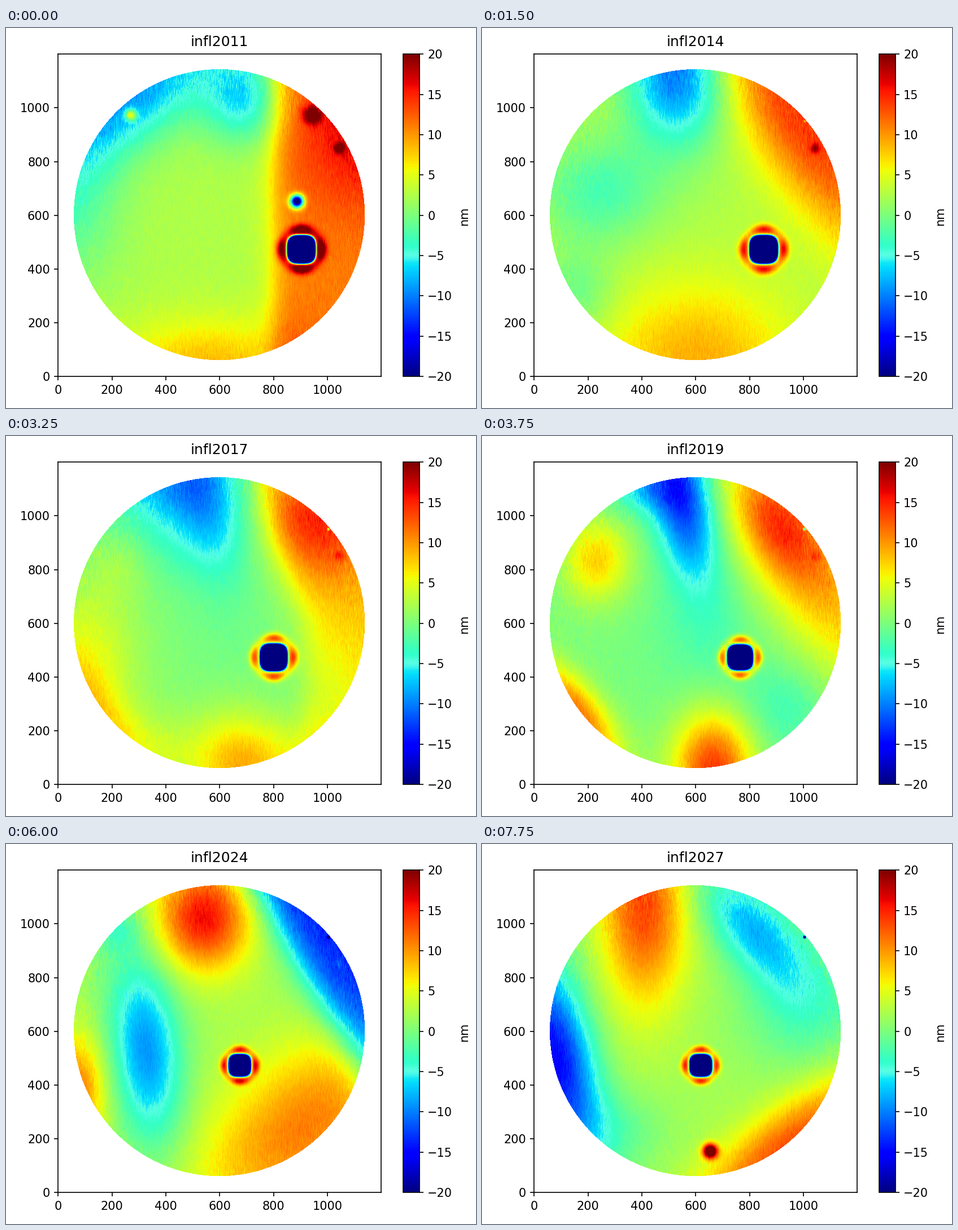
Recreate the animation shown at these times as a matplotlib script. Size 832 px wide and 673 px high, loop 8 s.

```python
import numpy as np
import matplotlib.pyplot as plt
from matplotlib.animation import FuncAnimation
from matplotlib.colors import ListedColormap

W, H, DPI = 832, 673, 128
PT = 150 / DPI
STEP_MS, STEPS = 250, 32
FIRST_YEAR = 2011
CUTS = [2, 3, 6, 8, 10, 13, 14, 15, 18, 19, 20, 21, 24, 26, 28, 31]

plt.rcParams.update({
    "font.family": "DejaVu Sans", "font.size": 10 * PT,
    "axes.titlesize": 12 * PT, "axes.titlepad": 6.6 * PT,
    "axes.linewidth": 0.8 * PT,
})
for axis in ("xtick", "ytick"):
    plt.rcParams.update({
        f"{axis}.major.size": 3.5 * PT, f"{axis}.major.width": 0.8 * PT,
        f"{axis}.major.pad": 3.5 * PT,
    })

# Pixel grid over the disc, in stage pixels
X0, Y0, N = 119, 72, 518
CX, CY, R = 377.6, 330.6, 257.6
HOLE_Y = 392
X, Y = np.meshgrid(X0 + 0.5 + np.arange(N), Y0 + 0.5 + np.arange(N))
RADIUS = np.hypot(X - CX, Y - CY) / R


def blob(x, y, height, sx, sy=None, tilt=0):
    """Gaussian hill; tilt turns its sx axis clockwise, in degrees."""
    c, s = np.cos(np.radians(tilt)), np.sin(np.radians(tilt))
    a = (c * (X - x) + s * (Y - y)) / sx
    b = (c * (Y - y) - s * (X - x)) / (sy or sx)
    return height * np.exp(-(a ** 2 + b ** 2) / 2)


def rise(dist, height, width):
    """Smooth step across the line where dist is zero."""
    return height / (1 + np.exp(np.clip(-dist / width, -30, 30)))


def valley(center, depth, width):
    return -depth * np.exp(-((X - center) / width) ** 2 / 2)


# Smooth part of the surface, in nm, for the key years
SURFACES = {
    2011: 2.5 + rise(X - 474, 8.5, 13)
    + blob(360, 600, 6, 110, 60) + blob(640, 170, 6, 90, 100)
    + blob(225, 115, -11, 130, 60, -35) + blob(420, 125, -8.5, 50, 55)
    + blob(120, 290, -4.5, 60, 110),

    2014: 2.5 + blob(570, 170, 11.5, 190, 65, 57)
    + blob(345, 80, -13, 60, 88) + blob(210, 290, -5, 75, 65)
    + blob(170, 470, -3.5, 45, 50) + blob(380, 590, 6.5, 120, 100),

    2016: 0.5 + rise(X - 486 - 0.33 * (np.minimum(Y, 330) - 205), 7, 14)
    + blob(310, 70, -9.5, 90, 80) + blob(330, 180, -3, 130, 70)
    + blob(560, 140, 9, 75, 70) + blob(135, 410, 8, 65, 95)
    + blob(480, 580, 7, 100, 60) + blob(240, 560, 4.5, 90, 50),

    2019: blob(352, 105, -13.5, 105, 38, 78) + blob(285, 95, -5, 45, 30)
    + blob(400, 350, -2, 70, 80) + blob(203, 220, 7.5, 42, 52)
    + blob(520, 150, 9.5, 85, 48, 62) + blob(620, 270, 8, 170, 80, 60)
    + blob(165, 490, 11.5, 80, 32, 50) + blob(410, 590, 14, 50, 70)
    + blob(540, 480, -3, 60),

    2022: 0.5 + blob(120, 320, 24, 65, 150)
    + valley(322 + 0.00062 * (Y - 150) ** 2, 8.5, 46)
    + blob(320, 115, -5, 45, 55)
    + blob(565, 320, 12, 52, 130) + blob(590, 210, 5, 35, 60),

    2024: 2 + blob(350, 130, 14, 58, 65)
    + rise(0.865 * (X - 535) - 0.503 * (Y - 235), -16, 18)
    + blob(248, 365, -11, 45, 122, -6) + blob(125, 440, 9.5, 35, 70)
    + blob(195, 150, -4, 30) + blob(530, 500, 9, 160, 88, -40),

    2027: 2 + blob(287, 110, 11.5, 52, 120)
    + blob(480, 150, -9.5, 90, 45, 48) + blob(570, 290, -4.5, 80, 75)
    + blob(130, 380, -17, 130, 48, 78) + blob(240, 510, -3, 60, 50)
    + blob(540, 540, 11, 150, 48, -38),
}
KEY_YEARS = list(SURFACES)

# Small spots seen in one year only
SPOTS = {
    2011: blob(542, 154, 11, 11) + blob(515, 307, -36, 8) + blob(221, 154, 13, 7),
    2027: blob(404, 544, 25, 9),
}


def streaks(seed):
    """Vertical grain, stronger towards the rim and the top."""
    grain = np.random.default_rng(seed).normal(size=(N, N))
    grain = sum(np.roll(grain, k, axis=0) for k in range(9)) / 3
    rim = np.clip(RADIUS, 0, 1) ** 5 * np.clip((560 - Y) / 350, 0.3, 1)
    return grain * (0.3 + 0.6 * rim)


def add_hole(z, x, half, halo):
    dx, dy = X - x, Y - HOLE_Y
    r = np.hypot(dx, dy)
    lobes = 0.45 + 0.55 * np.cos(2 * np.arctan2(dy, dx)) ** 2
    z = z + halo * lobes * np.exp(-((r - 1.36 * half) / (0.36 * half)) ** 2)
    d = (np.abs(dx) ** 3.2 + np.abs(dy) ** 3.2) ** (1 / 3.2)
    outside = rise(d - half, 1, 1)
    return z * outside - 26 * (1 - outside)


def base(year):
    k = min(np.searchsorted(KEY_YEARS, year, side="right"), len(KEY_YEARS) - 1)
    a, b = KEY_YEARS[k - 1], KEY_YEARS[k]
    mix = (year - a) / (b - a)
    return (1 - mix) * SURFACES[a] + mix * SURFACES[b]


def picture(n):
    """Surface n years after the first; the hole drifts left and shrinks."""
    year = FIRST_YEAR + n
    z = base(year) + streaks(year) + SPOTS.get(year, 0)
    z += blob(590, 213, 10 * np.exp(-n / 6), 6) - blob(571, 165, 2.2 * n, 1.5)
    hole_x = 523 - 8 * n - 0.03 * n ** 2
    half = np.clip(25.7 - 0.9 * (n - 5), 20.3, 25.7)
    z = add_hole(z, hole_x, half, 13)
    return np.where(RADIUS <= 1, z, np.nan)


def box(x, y, w, h):
    return [x / W, 1 - (y + h) / H, w / W, h / H]


def pale_jet():
    """Jet with a lighter band around -5."""
    v = np.linspace(-20, 20, 256)
    rgba = plt.get_cmap("jet")(np.linspace(0, 1, 256))
    rgba[:, 0] += 0.25 * np.exp(-((v + 5) / 0.8) ** 2)
    return ListedColormap(np.clip(rgba, 0, 1))


PICTURES = [picture(n) for n in range(len(CUTS) + 1)]

fig = plt.figure(figsize=(W / DPI, H / DPI), dpi=DPI, facecolor="white")
ax = fig.add_axes(box(92.4, 46.2, 571.8, 571))
ax.set(xlim=(0, 1200), ylim=(0, 1200),
       xticks=range(0, 1001, 200), yticks=range(0, 1001, 200))
title = ax.set_title("")

disc = fig.add_axes(box(X0, Y0, N, N))
disc.axis("off")
image = disc.imshow(PICTURES[0], cmap=pale_jet(), vmin=-20, vmax=20,
                    interpolation="nearest", aspect="auto")

bar = fig.colorbar(image, cax=fig.add_axes(box(703, 46.2, 28.6, 571)))
bar.set_ticks(range(-20, 21, 5))
fig.text(817.5 / W, 1 - 333 / H, "nm", rotation=90, rotation_mode="anchor",
         ha="center", va="baseline")


def draw(step):
    n = int(np.searchsorted(CUTS, step, side="right"))
    image.set_data(PICTURES[n])
    title.set_text(f"infl{FIRST_YEAR + n}")
    return image, title


anim = FuncAnimation(fig, draw, frames=STEPS, interval=STEP_MS,
                     repeat=True, repeat_delay=0, blit=False)
plt.show()
```
